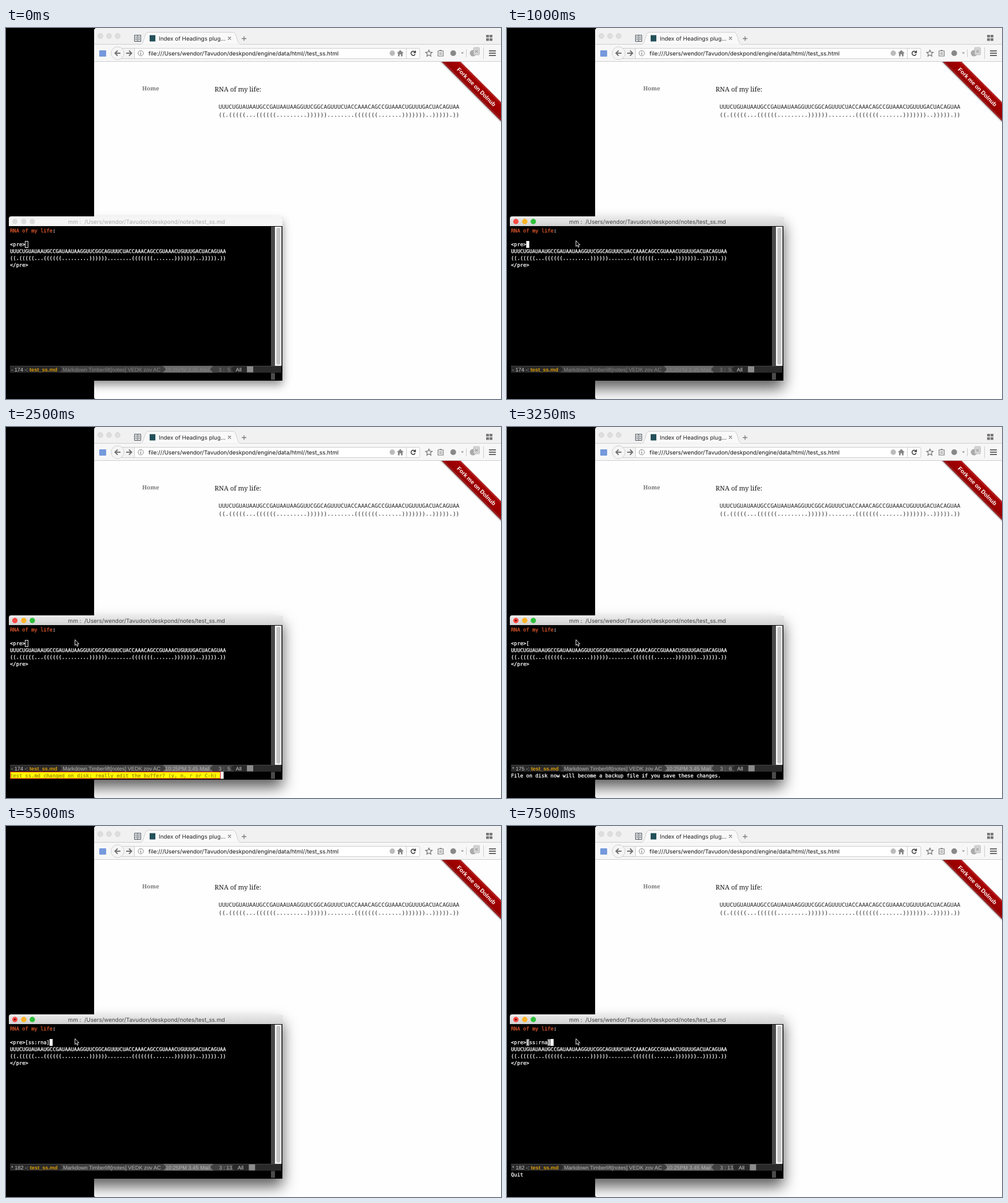
Recreate the animation shown at these times as an HTML page. Size 865 px wide and 648 px high, loop 8000 ms.

```html
<!DOCTYPE html>
<html lang="en">
<head>
<meta charset="utf-8">
<title>Editor and browser</title>
<style>
  html, body { margin: 0; width: 100%; height: 100%; overflow: hidden; background: #000; }
  svg { display: block; width: 100%; height: 100%; }
  text { white-space: pre; text-rendering: geometricPrecision; }
  .ui { font: 9.9px Inter, sans-serif; }
  .serif { font: 11.4px "Noto Serif", serif; }
  .page { font: 9.86px "DejaVu Sans Mono", monospace; fill: #222; }
  .term { font: 8.84px "DejaVu Sans Mono", monospace; color: #fff; }
  .term, .term tspan { fill: currentColor; stroke: currentColor; stroke-width: .3; }
  .mode { font: 9.3px "Liberation Sans", Arial, sans-serif; fill: #ccc; }
  .mode .soft { fill: #b4b8b4; }
  .mode.dim .soft { fill: #858585; }
  .line { fill: none; stroke: #777; stroke-width: 1.3; }
  .rule { fill: none; stroke: #ccc; stroke-width: 1; }
</style>
</head>
<body>
<svg viewBox="0 0 865 648" preserveAspectRatio="none">
  <defs>
    <linearGradient id="bar" x2="0" y2="1">
      <stop stop-color="#ececec"/><stop offset="1" stop-color="#d2d2d2"/>
    </linearGradient>
    <linearGradient id="red" x2="0" y2="1">
      <stop stop-color="#a00"/><stop offset="1" stop-color="#910000"/>
    </linearGradient>
    <clipPath id="pageArea"><rect x="154" y="59" width="711" height="589"/></clipPath>
  </defs>
  <rect width="865" height="648"/>

  <g id="browser">
    <path d="M154 5Q154 0 159 0H865V648H157Q154 648 154 645Z" fill="#fefefe"/>
    <path d="M154 5Q154 0 159 0H865V29H154Z" fill="#f1f1f1"/>
    <path d="M154 28.5H865V59H154Z" fill="#f7f7f7"/>
    <path class="rule" d="M154 28.5H236M409 28.5H865M154 58.5H865"/>
    <g fill="#dedede" stroke="#cdcdcd" stroke-width=".7">
      <circle cx="165" cy="14" r="4.4"/><circle cx="180" cy="14" r="4.4"/><circle cx="195" cy="14" r="4.4"/>
    </g>
    <path d="M234 29C243 29 240 7.500 249 7.500H396C405 7.500 402 29 411 29Z" fill="#f9f9f9" stroke="#c4c4c4" stroke-width=".8"/>
    <path d="M235 29.500H410" stroke="#f7f7f7" stroke-width="2"/>
    <path d="M224.500 12.500H235.500V23.500H224.500ZM230 12.500V23.500M226 15.500H228.500M226 18H228.500M226 20.500H228.500M231.500 15.500H234M231.500 18H234M231.500 20.500H234" fill="none" stroke="#454f58"/>
    <rect x="251" y="12.500" width="10" height="11" fill="#23505a"/>
    <text class="ui" x="267" y="22" fill="#222">Index of Headings plug...</text>
    <path class="line" d="M388 15.500L393 20.500M393 15.500L388 20.500M412 18.500H420M416 14.500V22.500"/>
    <path d="M839 12H844V16.500H839ZM845 12H850V16.500H845ZM839 18H844V22.500H839ZM845 18H850V22.500H845Z" fill="#777"/>

    <rect x="163" y="39" width="12" height="11" rx="1" fill="#7599dc"/>
    <rect class="rule" x="196" y="35.500" width="527" height="18" rx="2" style="fill:#fff"/>
    <path d="M196 36H224V53H196Z" fill="#f3f3f3"/>
    <path class="rule" d="M224.500 36V53M699.500 36V53"/>
    <circle cx="195" cy="44" r="11.300" fill="#f5f5f5" stroke="#cfcfcf"/>
    <path d="M200 44H191M195 39.500L190.500 44L195 48.500M210 44H219M215 39.500L219.500 44L215 48.500" fill="none" stroke="#707070" stroke-width="2"/>
    <circle class="line" cx="235.500" cy="44" r="4.600" style="stroke-width:.9"/>
    <path d="M235.500 43V47M235.500 41V42" stroke="#666"/>
    <text class="ui" x="249" y="48" fill="#111">file:///Users/wendor/Tavudon/deskpond/engine/data/html//test_ss.html</text>
    <circle cx="675" cy="44" r="4.700" fill="#bbb"/>
    <path d="M683 44L689 38.500L695 44H693V49.500H690.200V46H687.800V49.500H685V44Z" fill="#888"/>
    <path d="M714.500 42A3.700 3.700 0 1 0 715 45.500M715.500 39.500V43H712" fill="none" stroke="#333" stroke-width="1.500"/>
    <path class="line" d="M739 38.500L740.700 42.200L744.700 42.600L741.700 45.300L742.600 49.300L739 47.200L735.400 49.300L736.300 45.300L733.300 42.600L737.300 42.200Z"/>
    <path class="line" d="M755 40H764V49H755ZM757.500 39H761.500M757 43.500H762M757 46H762" style="stroke-width:1.200"/>
    <circle cx="781.500" cy="44" r="5" fill="#888"/>
    <path d="M795 42.500H800L797.500 45.500Z" fill="#999"/>
    <path class="rule" d="M804.500 37V51M834.500 34V54"/>
    <circle cx="816" cy="44" r="5.500" fill="#aaa"/>
    <rect x="817" y="34" width="10.500" height="13" rx="1.500" fill="#d4d4d4" stroke="#aaa" stroke-width=".6"/>
    <path d="M820 38.500L824.500 43M824.500 38.500L820 43" stroke="#888"/>
    <path d="M844 40H856M844 44H856M844 48H856" stroke="#666" stroke-width="1.800"/>

    <text class="serif" x="238" y="109" fill="#777" style="font-size:9.900px;font-weight:bold">Home</text>
    <text class="serif" x="364.500" y="111" fill="#1a1a1a">RNA of my life:</text>
    <text class="page sequence" x="371.500" y="140.500"></text>
    <text class="page fold" x="371.500" y="154.500"></text>
    <g clip-path="url(#pageArea)">
      <g transform="translate(822 103) rotate(45)">
        <rect x="-100" y="-11.500" width="200" height="23" fill="url(#red)" style="filter:drop-shadow(0 1.500px 1.200px rgba(0,0,0,.5))"/>
        <path d="M-100 -9.500H100M-100 9.500H100" stroke="#fff" stroke-opacity=".7" stroke-width=".7" stroke-dasharray=".7 .7"/>
        <text y="3.500" text-anchor="middle" fill="#fff" style="font:bold 10px 'Liberation Sans',Arial,sans-serif">Fork me on Dolnub</text>
      </g>
    </g>
  </g>

  <g id="editor">
    <rect id="shadow" x="5" y="331" width="478" height="285"/>
    <rect x="5" y="340" width="477.500" height="276"/>
    <path id="titleBar" d="M5 346V333Q5 329 9 329H479Q483 329 483 333V346Z"/>
    <g id="buttons"><circle cx="15.500" cy="338" r="4.700"/><circle cx="31" cy="338" r="4.700"/><circle cx="46" cy="338" r="4.700"/></g>
    <circle id="unsaved" cx="15.500" cy="338" r="1.600" fill="#6c0704"/>
    <text id="title" class="ui" x="108.500" y="341.500">mm :  /Users/wendor/Tavudon/deskpond/notes/test_ss.md</text>
    <path d="M463 347H470V590H463ZM463 602.500H470V614.500H463Z" fill="#4b4b4b"/>
    <path d="M470 347H481.500V590H470Z" fill="#f8f8f8"/>
    <rect x="472.500" y="349" width="7" height="239" rx="3.500" fill="#c4c4c4"/>

    <g id="brackets" fill="#858585"><rect x="33.600" y="372" width="5.300" height="12"/><rect x="70.800" y="372" width="5.300" height="12"/></g>
    <rect id="cursor" y="372"/>
    <text class="term" x="7" y="356.700"><tspan style="color:#e0582c">RNA of my life</tspan>:</text>
    <text id="typed" class="term" x="7" y="381"></text>
    <text class="term sequence" x="7" y="393"></text>
    <text class="term fold" x="7" y="405.200"></text>
    <text class="term" x="7" y="417.300">&lt;/pre&gt;</text>

    <g id="modeLine" class="mode">
      <rect x="7" y="590" width="474" height="12" fill="#2a2a2a"/>
      <path d="M7 590.500H481" stroke="#444"/>
      <text id="size" x="9" y="599.500"></text>
      <g id="afterSize">
        <path d="M93 590H274L279 596L274 602H93L98 596Z" fill="#404040"/>
        <path d="M274 590H362L357 596L362 602H274L279 596Z" fill="#6a6a6a"/>
        <path d="M362 590H398L393 596L398 602H362L357 596Z" fill="#404040"/>
        <text x="41" y="599.500" font-weight="bold" style="fill:#d99a08">test_ss.md</text>
        <text class="soft" x="99" y="599.500">Markdown Timberlift[notes] VEDK zov AC</text>
        <text class="soft" x="278" y="599.500">10:25PM 3.45 Mail</text>
        <text id="position" class="soft" x="371.500" y="599.500"></text>
        <g id="afterPosition">
          <text x="401.500" y="599.500">All</text>
          <rect x="421" y="591" width="11" height="10.500" fill="#8c8c8c"/>
        </g>
      </g>
    </g>
    <g id="prompt">
      <rect x="7.500" y="602.500" width="367" height="11.500" fill="#ff0" stroke="#e01010"/>
      <rect x="375" y="602" width="5.300" height="12.500" fill="#fff"/>
    </g>
    <text id="echo" class="term" x="7" y="611.500"></text>
  </g>

  <path id="pointer" d="M.5 .5V10.500L2.800 8.400L4.300 12L6 11.300L4.500 7.800H7.500Z" fill="#000" stroke="#fff" stroke-width=".9"/>
</svg>
<script>
const LOOP = 8000, CELL = 5.32, LEFT = 7;
const SEQUENCE = 'UUUCUGUAUAAUGCCGAUAAUAAGGUUCGGCAGUUUCUACCAAACAGCCGUAAACUGUUUGACUACAGUAA';
const FOLD = '((.(((((...((((((.........))))))........(((((((.......)))))))..))))).))';
const $ = id => document.getElementById(id);
const fillAll = (selector, value) => document.querySelectorAll(selector).forEach(e => e.textContent = value);
fillAll('.sequence', SEQUENCE);
fillAll('.fold', FOLD);

// Each step changes part of the state and keeps the rest.
const steps = [
  [0, { typed: '', cursor: 'hollow', echo: '', pointer: null, active: false, bright: false, match: false, prompt: false }],
  [250, { pointer: [370, 238] }],
  [500, { pointer: [245, 354] }],
  [750, { pointer: [127, 370] }],
  [1000, { pointer: [120, 371], active: true, cursor: 'solid' }],
  [1500, { cursor: 'off' }],
  [2000, { cursor: 'solid' }],
  [2500, { cursor: 'hollow', bright: true, prompt: true, echo: 'test_ss.md changed on disk; really edit the buffer? (y, n, r or C-h)' }],
  [3250, { cursor: 'off', prompt: false, typed: '[', echo: 'File on disk now will become a backup file if you save these changes.' }],
  [3500, { cursor: 'solid' }],
  [4000, { typed: '[s', echo: '' }],
  [4250, { typed: '[ss' }],
  [4500, { typed: '[ss:' }],
  [5000, { typed: '[ss:rna' }],
  [5500, { typed: '[ss:rna]' }],
  [5750, { match: true }],
  [6000, { cursor: 'off' }],
  [6500, { cursor: 'solid' }],
  [7000, { cursor: 'off' }],
  [7250, { cursor: 'solid', echo: 'Quit' }],
];

function set(id, attributes) {
  for (const [name, value] of Object.entries(attributes)) $(id).setAttribute(name, value);
}
const show = (id, visible) => $(id).style.display = visible ? '' : 'none';

function drawWindow({ active, bright }) {
  const colors = active ? ['#fc4b45', '#fdb324', '#2dc03c'] : ['#dcdcdc', '#dcdcdc', '#dcdcdc'];
  [...$('buttons').children].forEach((button, i) => button.setAttribute('fill', colors[i]));
  set('titleBar', { fill: active ? 'url(#bar)' : '#f5f5f5' });
  set('title', { fill: active ? '#444' : '#ababab' });
  $('shadow').style.filter = active
    ? 'drop-shadow(0 13px 13px rgba(0,0,0,.65))'
    : 'drop-shadow(0 7px 8px rgba(0,0,0,.45))';
  $('modeLine').classList.toggle('dim', !bright);
}

function drawCursor({ cursor, typed }) {
  const x = LEFT + (5 + typed.length) * CELL;
  const hollow = cursor === 'hollow';
  show('cursor', cursor !== 'off');
  set('cursor', hollow
    ? { x: 33.5, y: 372.5, width: 5, height: 11, fill: 'none', stroke: '#eee' }
    : { x, y: 372, width: CELL, height: 12, fill: '#fff', stroke: 'none' });
}

function draw(time) {
  const state = Object.assign({}, ...steps.filter(([start]) => start <= time).map(([, change]) => change));
  const { typed, pointer, prompt } = state;
  const column = 5 + typed.length;
  drawWindow(state);
  drawCursor(state);
  show('unsaved', typed);
  show('brackets', state.match);
  show('prompt', prompt);
  show('pointer', pointer);
  if (pointer) set('pointer', { transform: `translate(${pointer})` });
  $('typed').textContent = '<pre>' + typed;
  $('size').textContent = `${typed ? '*' : '-'} ${174 + typed.length} -:`;
  $('position').textContent = '3 : ' + String(column).padStart(2);
  set('afterSize', { transform: `translate(${typed ? 0.7 : 0})` });
  set('afterPosition', { transform: `translate(${column > 9 ? 2.6 : 0})` });
  $('echo').textContent = state.echo;
  $('echo').style.color = prompt ? '#a88a00' : '#fff';
}

function tick() {
  draw(performance.now() % LOOP);
  requestAnimationFrame(tick);
}
tick();
</script>
</body>
</html>
```
